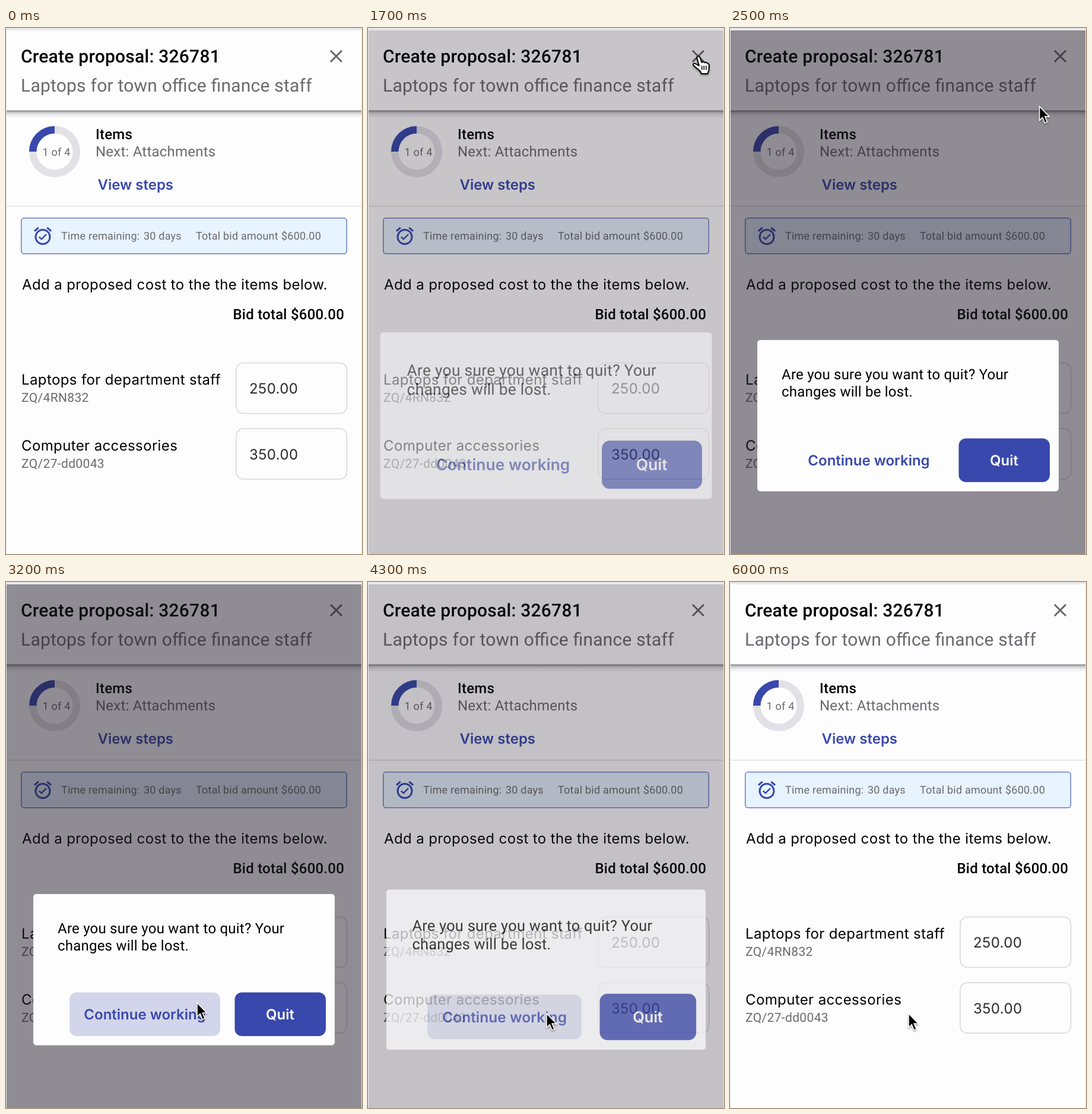
Recreate the animation shown at these times as an HTML page. Size 600 by 885 pixels, loop 6.4 s.

```html
<!DOCTYPE html>
<html lang="en">
<head>
<meta charset="utf-8">
<title>Create proposal</title>
<style>
  html, body { margin: 0; width: 100%; height: 100%; overflow: hidden; background: #fefdfe; }
  svg { display: block; width: 600px; height: 885px; }
  text {
    font: 24px Roboto, sans-serif; letter-spacing: .22px;
    font-feature-settings: "liga" 1; text-rendering: geometricPrecision;
  }
  .strong { font-weight: 500; }
  .big { font-size: 30px; }
  .grey { fill: #6a696d; }
  .small { font-size: 18px; }
  .code { font-size: 21px; letter-spacing: .35px; }
  .body { font-family: Inter, sans-serif; letter-spacing: .38px; }
  .button { font-family: Inter, sans-serif; font-weight: 600; letter-spacing: 0; }
  .blue { fill: #3848ac; }
  .line { fill: none; stroke: #3848ac; }
  .field { fill: #fefdfe; stroke: #d6d5da; stroke-width: 1.5; }
  #cursor { filter: drop-shadow(0 2px 1.5px rgba(0, 0, 0, .35)); }
</style>
</head>
<body>
<svg viewBox="0 0 600 885">
  <defs>
    <linearGradient id="shade" x2="0" y2="1">
      <stop stop-color="#a09fa2"/>
      <stop offset=".08" stop-color="#88878a"/>
      <stop offset=".2" stop-color="#bcbbbe"/>
      <stop offset=".5" stop-color="#e9e8ea"/>
      <stop offset="1" stop-color="#fefdfe"/>
    </linearGradient>
  </defs>

  <rect width="600" height="885" fill="#e9e8ec"/>
  <rect x="1" y="4" width="598" height="881" fill="#fefdfe"/>

  <!-- Header -->
  <rect x="1" y="138.5" width="598" height="13.5" fill="url(#shade)"/>
  <text class="big strong" x="25" y="57.5">Create proposal: 326781</text>
  <text class="big grey" x="25" y="107">Laptops for town office finance staff</text>
  <path d="M547 38L566 57M566 38L547 57" stroke="#666568" stroke-width="2.9"/>

  <!-- Progress -->
  <circle cx="82" cy="208" r="36.8" fill="none" stroke="#e2e1e5" stroke-width="12.5"/>
  <path class="line" d="M45.2 208A36.8 36.8 0 0 1 82 171.2" stroke-width="12.5"/>
  <text class="small grey" x="85" y="214.5" text-anchor="middle">1 of 4</text>
  <text class="strong" x="151" y="187">Items</text>
  <text class="grey" x="151" y="216">Next: Attachments</text>
  <text class="button blue" x="154.5" y="271.5">View steps</text>
  <rect x="1" y="299" width="598" height="1.5" fill="#e0dfe4"/>

  <!-- Time and amount -->
  <rect x="25.75" y="319.75" width="548.5" height="60" rx="4.5" fill="#e7f3fe" stroke="#6b7dc0" stroke-width="1.5"/>
  <g class="line" transform="translate(44 332) scale(1.5)">
    <circle cx="12" cy="13" r="8" stroke-width="2"/>
    <path d="M2.6 6.5L7.2 2.6M21.4 6.5L16.8 2.6" stroke-width="2"/>
    <path d="M7.9 12.9L10.5 15.6L16 10.1" stroke-width="1.6"/>
  </g>
  <g class="grey">
    <text class="small" x="93" y="356">Time remaining:</text>
    <text class="small" x="232" y="356">30 days</text>
    <text class="small" x="320" y="356">Total bid amount</text>
    <text class="small" x="464" y="356">$600.00</text>
  </g>

  <!-- Items -->
  <text class="body" x="27" y="440">Add a proposed cost to the the items below.</text>
  <text class="strong" x="570" y="489.5" text-anchor="end">Bid total $600.00</text>
  <text class="body" x="26" y="600">Laptops for department staff</text>
  <text class="code grey" x="26" y="629">ZQ/4RN832</text>
  <text class="body" x="26" y="710.5">Computer accessories</text>
  <text class="code grey" x="26" y="740">ZQ/27-dd0043</text>
  <rect class="field" x="388" y="563.5" width="186.5" height="85" rx="12"/>
  <rect class="field" x="388" y="674" width="186.5" height="85" rx="12"/>
  <text class="body" x="410" y="615" fill="#2b2a2e">250.00</text>
  <text class="body" x="410" y="725.5" fill="#2b2a2e">350.00</text>

  <rect id="veil" x="1" y="4" width="598" height="881" fill="#1e1824"/>

  <g id="dialog">
    <rect x="46" y="525" width="508" height="254.5" rx="5" fill="#fefdfe"/>
    <text x="87" y="591">Are you sure you want to quit? Your</text>
    <text x="87" y="620">changes will be lost.</text>
    <g id="resume">
      <rect id="pill" x="107" y="690.5" width="254" height="73.5" rx="12" fill="#d3d6ea"/>
      <text class="button blue" x="234" y="736" text-anchor="middle">Continue working</text>
    </g>
    <rect class="blue" x="385.5" y="690.5" width="153.5" height="73.5" rx="12"/>
    <text class="button" x="462" y="736" text-anchor="middle" fill="#fefdfe">Quit</text>
  </g>

  <g id="cursor">
    <path id="arrow" d="M0 0V23.5L5.2 18.7L9 28L13.2 26.2L9.3 17H16.5Z" stroke="#fff" stroke-width="1.6"/>
    <g id="hand" stroke="#000" stroke-width="2" stroke-linejoin="round">
      <path fill="#fff" d="M-.5 3.5C-1.5 0 3 -1.5 4.5 2L7.5 10.5Q10.5 8 13 11Q16 9 17.5 12.5Q20 12 20 16L19.5 23.5L17.5 29.5H7L5 25.5Q-1 20 -6.5 15.5Q-8 11 -3 12.5L3 16Z"/>
      <path fill="none" stroke-width="1.5" d="M7.8 16V23M11.3 16V23M14.8 16V23"/>
    </g>
  </g>
</svg>
<script>
const LOOP = 6400, STEP = 100;
const $ = id => document.getElementById(id);
const ramp = (t, from, to) => Math.min(1, Math.max(0, (t - from) / (to - from)));
const smooth = p => p * p * (3 - 2 * p);

// Pointer stops: time in ms, x, y
const path = [
  [0, 612, -45], [700, 572, 30], [1000, 565, 41], [1300, 562, 46], [1500, 562, 46],
  [1600, 555, 47.5], [2200, 555, 47.5], [2900, 470, 262], [3200, 322, 708], [3600, 301, 726]
];

function pointer(t) {
  const i = path.findIndex(stop => stop[0] > t);
  if (i < 0) return path.at(-1).slice(1);
  const [t0, x0, y0] = path[i - 1], [t1, x1, y1] = path[i];
  const p = smooth(ramp(t, t0, t1));
  return [x0 + (x1 - x0) * p, y0 + (y1 - y0) * p];
}

const scaleAt = (x, y, s) => `translate(${x} ${y}) scale(${s}) translate(${-x} ${-y})`;

function draw(t) {
  const opened = 1 - (1 - ramp(t, 1600, 1900)) ** 1.7;
  const closing = ramp(t, 4100, 4400);
  const shown = opened * (1 - closing ** 3);
  const press = ramp(t, 4000, 4200);

  $('veil').setAttribute('opacity', .49 * opened * (1 - closing ** 1.9));
  $('dialog').setAttribute('opacity', shown);
  $('dialog').setAttribute('transform', scaleAt(300, 652, 1 + .2 * (1 - shown)));
  $('pill').setAttribute('opacity', ramp(t, 3000, 3200) * (1 - .2 * press));
  $('resume').setAttribute('transform', scaleAt(234, 727, 1 - .035 * press));

  const overClose = t >= 900 && t < 2300;
  $('cursor').setAttribute('transform', `translate(${pointer(t)})`);
  $('hand').setAttribute('visibility', overClose ? 'visible' : 'hidden');
  $('arrow').setAttribute('visibility', overClose ? 'hidden' : 'visible');
}

const start = performance.now();
function tick() {
  const t = (performance.now() - start) % LOOP;
  draw(Math.floor(t / STEP) * STEP);
  requestAnimationFrame(tick);
}
tick();
</script>
</body>
</html>
```
